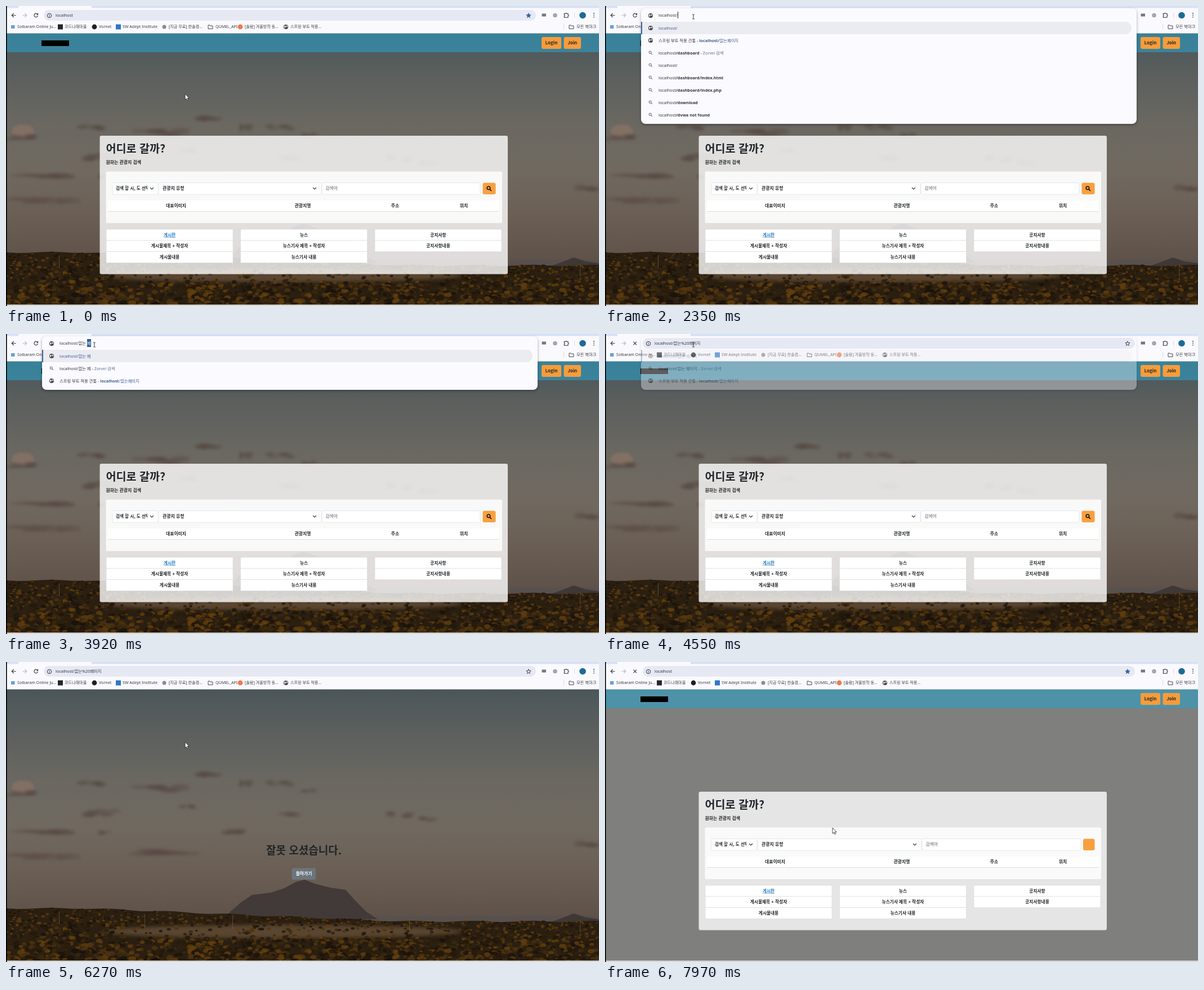
Write an HTML page with a canvas that moves like this. It is 1053 by 532 pixels and loops after 8000 ms.

```html
<!DOCTYPE html>
<html lang="ko">
<head>
<meta charset="utf-8">
<title>Page not found demo</title>
<style>
html, body { margin: 0; width: 100%; height: 100%; overflow: hidden; background: #7f7f7d; }
canvas, svg.layer { position: absolute; left: 0; top: 0; width: 1053px; height: 532px; }
body { font: 7.3px "Noto Sans", "Noto Sans CJK KR", sans-serif; color: #33363b; }
.site text { font-family: "Noto Sans CJK KR", "Noto Sans", sans-serif; font-weight: 700; fill: #212529; }
.mid { text-anchor: middle; }

.loaded { animation: loaded 8s step-end infinite; }
.bare { animation: bare 8s step-end infinite; }
.home { animation: home 8s step-end infinite; }
.lost { animation: lost 8s step-end infinite; }
@keyframes loaded { 0% { opacity: 1 } 57.5% { opacity: 0 } 71.75% { opacity: 1 } 97.875%, 100% { opacity: 0 } }
@keyframes bare { 0% { opacity: 0 } 57.5% { opacity: 1 } 71.75% { opacity: 0 } 97.875%, 100% { opacity: 1 } }
@keyframes home { 0% { opacity: 1 } 57.5% { opacity: 0 } 97.875%, 100% { opacity: 1 } }
@keyframes lost { 0% { opacity: 0 } 57.5% { opacity: 1 } 97.875%, 100% { opacity: 0 } }

#back { fill: #6c757d; animation: hover 8s step-end infinite; }
@keyframes hover { 0% { fill: #6c757d } 86.4%, 100% { fill: #565e64 } }

#drop { position: absolute; left: 64px; top: 4px; width: 880px; border-radius: 8px; background: #fbfaff;
  box-shadow: 0 2px 5px #0005; overflow: hidden; padding-top: 24px; box-sizing: border-box;
  animation: drop 8s linear infinite; }
@keyframes drop { 0%, 25.999% { opacity: 0 } 26%, 55% { opacity: 1 } 56.875% { opacity: .38 } 57.5%, 100% { opacity: 0 } }
.row { position: relative; height: 22px; line-height: 22px; padding-left: 31px; white-space: pre; }
.row:first-child { width: 840px; background: #ebebf2; border-radius: 0 11px 11px 0; box-shadow: inset 2px 0 #3b5f96; color: #3b5f96; }
.row svg { position: absolute; left: 12px; top: 6px; width: 10px; height: 10px; }
.row i { font-style: normal; color: #3b5f96; }
.row u { text-decoration: none; color: #56708a; }
b { font-weight: 700; }

#bar { position: absolute; left: 67px; top: 7px; width: 874px; height: 19px; border-radius: 10px; background: #e6e8f4; }
#bar.focus { background: #fff; box-shadow: inset 0 0 0 1.5px #2f5f9e; }
#bar.open { background: none; }
#url { position: absolute; left: 21px; top: 0; line-height: 19px; white-space: pre; }
.open #url { left: 28px; }
#url mark { background: #2b5f9b; color: #fff; padding: 2px 0; }
#url s { border-left: 1px solid #222; padding: 1px 0; }
#bar svg { position: absolute; width: 10px; height: 10px; top: 4.5px; left: 5px; }
#bar #star { left: 855.5px; }
.open #lead { left: 9px; }

#cursor { animation: move 8s linear infinite; }
@keyframes move {
  0%, .875% { transform: translate(318px, 156px) }
  1.9% { transform: translate(326px, 157px) }
  5% { transform: translate(220px, 70px) }
  8% { transform: translate(70px, 9px) }
  10%, 11% { transform: translate(92px, 17px) }
  14% { transform: translate(150px, 17px) }
  16.25%, 66.6% { transform: translate(157px, 19px) }
  70.9% { transform: translate(315px, 142px) }
  72.6%, 78.4% { transform: translate(318px, 142px) }
  81% { transform: translate(440px, 240px) }
  83.6% { transform: translate(612px, 404px) }
  85.4% { transform: translate(560px, 392px) }
  87%, 95.375% { transform: translate(527px, 380px) }
  99.6%, 100% { transform: translate(404px, 294px) }
}
#arrow { animation: arrow 8s step-end infinite; }
#beam { animation: beam 8s step-end infinite; }
#hand { animation: hand 8s step-end infinite; }
@keyframes arrow { 0% { opacity: 1 } 8% { opacity: 0 } 67.5% { opacity: 1 } 86.4% { opacity: 0 } 96%, 100% { opacity: 1 } }
@keyframes beam { 0% { opacity: 0 } 8% { opacity: 1 } 67.5%, 100% { opacity: 0 } }
@keyframes hand { 0% { opacity: 0 } 86.4% { opacity: 1 } 96%, 100% { opacity: 0 } }
</style>
</head>
<body>
<canvas id="photo" class="loaded" width="1053" height="532"></canvas>
<svg id="stage" class="layer" viewBox="0 0 1053 532">
  <defs>
    <symbol id="globe" viewBox="0 0 10 10">
      <circle cx="5" cy="5" r="4" fill="#3c4045"/>
      <path d="M2 3.6 4.6 3 5.3 4.6 3.8 5.6 4 7.8 2.4 6ZM6 2 8 3.6 7.6 5.8 6.2 5.2Z" fill="#fff"/>
    </symbol>
    <symbol id="info" viewBox="0 0 10 10">
      <circle cx="5" cy="5" r="3.7" fill="none" stroke="#33363b"/>
      <path d="M5 4.6V7M5 2.8V3.8" stroke="#33363b"/>
    </symbol>
    <symbol id="lens" viewBox="0 0 10 10">
      <circle cx="4.2" cy="4.2" r="2.1" fill="none" stroke="#44474c" stroke-width=".9"/>
      <path d="M5.8 5.8 8 8" stroke="#44474c" stroke-width="1"/>
    </symbol>
    <symbol id="folder" viewBox="0 0 10 10">
      <path d="M1 2H4L5 3.2H9V8.4H1Z" fill="none" stroke="#44474c"/>
    </symbol>
  </defs>
</svg>
<div id="drop"></div>
<div id="bar">
  <svg id="lead"><use href="#info"/></svg>
  <span id="url"></span>
  <svg id="star" viewBox="-5 -5 10 10"><path stroke="#2f5f9e" stroke-width=".9" stroke-linejoin="round"/></svg>
</div>
<svg class="layer" viewBox="0 0 1053 532">
  <g id="cursor">
    <path id="arrow" d="M0 0V10.2L2.3 8.1 3.9 11.6 5.5 10.9 4 7.5H7.1Z" fill="#fff" stroke="#222" stroke-width=".8"/>
    <path id="beam" d="M-2-4H-.5L0-3.5 .5-4H2M0-3.5V3.5M-2 4H-.5L0 3.5 .5 4H2" fill="none" stroke="#222" stroke-width=".9"/>
    <path id="hand" d="M-1.2 0Q0-1 1 0V4L5 5Q6 5.4 5.8 7L5 10V12H-.6V10.6L-4 7.4Q-4 5.8-2.6 6.2L-1.2 7.2Z" fill="#fff" stroke="#222" stroke-width=".7"/>
  </g>
</svg>

<script>
const $ = id => document.getElementById(id);

// ---- SVG helpers
const rect = (x1, y1, x2, y2, fill, more = '') =>
  `<rect x="${x1}" y="${y1}" width="${x2 - x1}" height="${y2 - y1}" fill="${fill}" ${more}/>`;
const text = (x, y, s, size = 7.3, more = '') =>
  `<text x="${x}" y="${y + size * .37}" font-size="${size}" ${more}>${s}</text>`;
const mid = (x, y, s, size = 7.8, more = '') => text(x, y, s, size, 'class="mid" ' + more);
const line = (d, color = '#33363b', w = 1.1, more = '') =>
  `<path d="${d}" fill="none" stroke="${color}" stroke-width="${w}" ${more}/>`;
const dot = (x, y, r, fill) => `<circle cx="${x}" cy="${y}" r="${r}" fill="${fill}"/>`;
const icon = (id, x, y, size = 10) =>
  `<use href="#${id}" x="${x - size / 2}" y="${y - size / 2}" width="${size}" height="${size}"/>`;
const chevron = x => line(`M${x - 3} 322 l3 3 3-3`);

// ---- Home page
const box = 'rx="2" stroke="#dee2e6" stroke-width=".8"';
const fields = (x2, x3, x4) =>
  rect(189, 313.5, 270, 334, '#fff', box) + rect(271, 313.5, x2, 334, '#fff', box) +
  rect(x2 + 1, 313.5, x3, 334, '#fff', box) + rect(x4, 313.5, 869.5, 334, '#f8a03f', 'rx="3"') +
  text(278, 323.5, '관광지 유형', 7.9) + text(x2 + 7.5, 323.5, '검색어', 7.7, 'style="fill:#5b6066;font-weight:500"') +
  chevron(259) + chevron(x2 - 12) +
  `<svg x="189" y="313" width="62.5" height="21" viewBox="189 313 62.5 21">${text(195, 323.5, '검색 할 시, 도 선택', 7.6)}</svg>`;

const list = (x, rows) => rows.map((s, i) => {
  const y = 396 + i * 19.8;
  const link = s === '게시판' ? 'style="fill:#2a80c8;text-decoration:underline"' : '';
  return rect(x, y, x + 225, y + 19.8, '#fff', 'stroke="#dcdcdc" stroke-width=".7"') + mid(x + 112.5, y + 9.7, s, 7.7, link);
}).join('');

const home = `<g class="home">
  ${rect(0, 48, 1053, 82, 'rgba(43,160,200,.58)')}
  ${rect(63, 61, 112, 71, '#000')}
  ${rect(951, 55, 986, 76, '#f59c3c', 'rx="3"')}${mid(968.5, 65, 'Login', 8)}
  ${rect(990.5, 55, 1021, 76, '#f59c3c', 'rx="3"')}${mid(1005.7, 65, 'Join', 8)}
  ${rect(166.5, 230, 891, 475.5, 'rgba(255,255,255,.8)', 'rx="3"')}
  ${text(177.5, 253, '어디로 갈까?', 19.6)}
  ${text(177.5, 277.5, '원하는 관광지 검색', 7.9)}
  ${rect(177.5, 293.5, 881, 385, 'rgba(255,255,255,.8)', 'rx="2"')}
  <g class="loaded">${fields(560, 842, 846.5)}
    <circle cx="857" cy="322.8" r="2.8" fill="none" stroke="#111" stroke-width="1.5"/>${line('M859 325 l3 3', '#111', 1.7)}</g>
  <g class="bare">${fields(562, 845, 849)}</g>
  ${rect(181, 345, 876, 364, '#fff')}${line('M181 364.5H876', '#d8dbde', .9)}
  ${mid(302, 354.5, '대표이미지')}${mid(527, 354.5, '관광지명')}${mid(691, 354.5, '주소')}${mid(813, 354.5, '위치')}
  ${list(178, ['게시판', '게시물제목 + 작성자', '게시물내용'])}
  ${list(416.5, ['뉴스', '뉴스기사 제목 + 작성자', '뉴스기사 내용'])}
  ${list(655, ['공지사항', '공지사항내용'])}
</g>`;

// ---- Error page
const lost = `<g class="lost">
  <g class="bare">${rect(504, 365.5, 553.5, 386.5, '#6c757d', 'rx="3"')}</g>
  <g class="loaded">
    ${mid(529, 334, '잘못 오셨습니다.', 19)}
    ${rect(507.5, 365.5, 550, 386, '#6c757d', 'rx="3" id="back"')}
    ${mid(529, 375.5, '돌아가기', 7.8, 'style="fill:#fff"')}
  </g>
</g>`;

// ---- Browser frame
const marks = [
  [20, 'Solbaram Online Ju...'], [104, '코드나래마을'], [165, 'Vornet'], [207, 'SW Adept Institute'],
  [289, '[지금 무료] 한솔겸...'], [372, 'QUMEL_API'], [424, '[솔람] 겨울방학 동...'], [505, '스프링 부트 적용...']
];
const frame = `<g fill="#3a3d42">
  ${rect(0, 0, 1053, 48.5, '#faf9fe')}
  ${rect(0, 0, 22, 3.5, '#d5e1f8', 'rx="1"')}${rect(152, 0, 1053, 3.5, '#d5e1f8', 'rx="1"')}
  ${line('M17.5 16.5H10.5M13.7 13 10.2 16.5 13.7 20')}
  ${line('M29.5 16.5H36.5M33.3 13 36.8 16.5 33.3 20', '#b9bbc0')}
  <g id="reload">${line('M56 14.6A3.3 3.3 0 1 0 56.5 17.2M56.6 12.8V15.2H54')}</g>
  <g id="stop">${line('M50.5 13.7l5.6 5.6m0-5.6l-5.6 5.6')}</g>
  ${rect(951.5, 13.5, 959, 18.5, '#777')}${dot(975, 16.5, 3.8, '#a6a6a6')}
  ${line('M991.3 13.5H993.5Q994.6 11 995.7 13.5H998V15.7Q1000.5 16.7 998 17.8V20.2H991.3V18Q993 16.8 991.3 15.6Z')}
  ${line('M1009.5 12V21', '#cfd6ea', .8)}${dot(1024, 16.5, 5.8, '#1f6a94')}
  ${[13, 16.3, 19.6].map(y => dot(1044, y, .9, '#33363b')).join('')}
  ${rect(9, 34, 15.5, 40, '#6d9fd4')}${rect(92, 32.5, 101, 41.5, '#22262d')}
  ${dot(157, 37, 4.4, '#1b1f23')}${rect(195, 32.5, 204, 41.5, '#2f78c8')}
  ${dot(281, 37, 3.5, '#8b8b8b')}${icon('folder', 363, 37)}${dot(416, 37, 4.4, '#ee7b48')}${icon('globe', 497, 37)}
  ${marks.map(([x, s]) => text(x, 36.5, s, 7.1)).join('')}
  ${line('M990.5 32V41', '#cfd6ea', .8)}${icon('folder', 1004, 37)}${text(1013, 36.5, '모든 북마크')}
  ${rect(0, 529.5, 1053, 532, '#d9d9d7')}${rect(0, 0, 1.6, 532, '#000')}
</g>`;
$('stage').insertAdjacentHTML('beforeend', `<g class="site">${home}${lost}</g>${frame}`);

const starPath = Array.from({ length: 10 }, (_, i) => {
  const r = i % 2 ? 1.8 : 4.3, a = i * Math.PI / 5;
  return `${(r * Math.sin(a)).toFixed(2)} ${(-r * Math.cos(a)).toFixed(2)}`;
}).join('L');
const star = $('star').firstChild;
star.setAttribute('d', `M${starPath}Z`);

// ---- Landscape behind the pages
function paintPhoto() {
  const g = $('photo').getContext('2d');
  let seed = 7;
  const rnd = () => (seed = seed * 16807 % 2147483647) / 2147483647;
  const blob = (x, y, rx, ry, color) => {
    g.fillStyle = color;
    g.beginPath();
    g.ellipse(x, y, rx, ry, 0, 0, 7);
    g.fill();
  };
  const shape = (color, ...pts) => {
    g.fillStyle = color;
    g.beginPath();
    pts.forEach(p => g.lineTo(...p));
    g.fill();
  };
  const sky = g.createLinearGradient(0, 48, 0, 460);
  ['#4b565a', '#5d605e', '#6b6861', '#706960', '#6a5e54', '#5d5048'].forEach((c, i) => sky.addColorStop(i / 5, c));
  g.fillStyle = sky;
  g.fillRect(0, 0, 1053, 532);

  g.filter = 'blur(2px)';
  blob(30, 222, 20, 12, 'rgba(140,116,102,.7)');
  const clouds = [
    [30, 233, 36, 7], [150, 215, 28, 7], [275, 224, 55, 9], [353, 200, 34, 7], [425, 216, 13, 9], [488, 215, 28, 6],
    [540, 228, 16, 3], [170, 268, 38, 9], [320, 256, 18, 4], [500, 270, 24, 5], [405, 302, 32, 7], [700, 271, 26, 6],
    [748, 278, 18, 5], [175, 303, 13, 4], [270, 337, 75, 8], [1025, 322, 32, 7], [60, 302, 70, 7], [70, 345, 70, 7]
  ];
  for (const [x, y, rx, ry] of clouds)
    for (let i = 0; i < 9; i++)
      blob(x + (rnd() - .5) * rx * 1.5, y + (rnd() - .5) * ry, rx * .3, ry * .45, 'rgba(88,70,66,.32)');
  g.filter = 'none';

  shape('#58504d', [630, 451], [1053, 450], [1053, 470], [630, 470]);
  shape('#3f3836', [965, 462], [990, 453], [1008, 446], [1030, 453], [1053, 456], [1053, 465]);
  shape('#423a38', [396, 445], [415, 428], [437, 413], [470, 409], [492, 402], [515, 390], [530, 386], [548, 393],
    [575, 400], [603, 404], [620, 423], [640, 443], [660, 456], [400, 460]);

  const top = x => 437 + 23 * Math.min(1, Math.max(0, (x - 150) / 550)) + Math.sin(x / 17) * 1.2;
  const ground = Array.from({ length: 54 }, (_, i) => [i * 20, top(i * 20)]);
  shape('#2b1f11', ...ground, [1060, 532], [0, 532]);
  g.filter = 'blur(3px)';
  blob(490, 478, 320, 12, '#594530');
  g.filter = 'none';
  const leaves = ['#1a130b', '#281c0d', '#3a280f', '#4d3310', '#633f0d', '#21180c'];
  const count = 2600;
  for (let i = 0; i < count; i++) {
    const x = rnd() * 1053, depth = i / count, y = top(x) + depth * (534 - top(x));
    const field = x > 210 && x < 810 && y > 468 && y < 490;
    const color = leaves[Math.floor(rnd() * 6)], r = 1.5 + depth * 4 * rnd();
    if (field && rnd() < .72) continue;
    g.globalAlpha = .8;
    blob(x, y, r * 1.5, r, color);
  }
  g.globalAlpha = .6;
  for (const [x, y] of [[94, 441], [246, 447], [402, 449], [716, 455], [1019, 459]]) {
    g.fillStyle = '#75644f';
    g.fillRect(x, y, 1, 24);
  }
}
paintPhoto();

// ---- Address bar: [time, settled text, character being composed]
const typing = [
  [2080, '', ''], [2610, '', 'ㅇ'], [2740, '', '어'], [3070, '', '업'], [3210, '', '없'],
  [3390, '없', 'ㄴ'], [3490, '없', '느'], [3590, '없', '는'], [3690, '없는 ', ''], [3790, '없는 ', 'ㅍ'],
  [3890, '없는 ', '페'], [3990, '없는 페', '이'], [4090, '없는 페', '잊'], [4190, '없는 페이', '지']
];
const host = 'localhost';
const row = (id, html) => `<div class="row"><svg><use href="#${id}"/></svg>${html}</div>`;

function suggestions(word) {
  const first = row('globe', `${host}/${word}`);
  const search = ' - <u>Zorvel 검색</u>';
  const known = '스프링 부트 적용 관통 - ';
  if (word.length > 1) {
    return first + row('lens', `${host}/${word}${search}`) + row('globe', `${known}<i><b>${host}</b>/없는페이지</i>`);
  }
  const hit = word === '없' ? '없' : '';
  return first + row('globe', `${known}<i><b>${host}/${hit}</b>${hit ? '는페이지' : '없는페이지'}</i>`) +
    row('lens', `${host}<b>/dashboard</b>${search}`) + row('lens', `${host}/${word}`) +
    ['/dashboard/index.html', '/dashboard/index.php', '/download', '/dvwa not found']
      .map(s => row('lens', `${host}<b>${s}</b>`)).join('');
}

function address(t) {
  if (t < 1120 || t >= 7360) return host;
  if (t < 1550) return `<mark>${host}</mark>`;
  if (t < 2080) return host + '<s></s>';
  if (t >= 4400) return host + '/없는%20페이지';
  const [, done, part] = typing.findLast(k => k[0] <= t);
  return `${host}/${done}` + (part ? `<mark>${part}</mark>` : '<s></s>');
}

const shown = {};
function setHtml(id, html) {
  if (shown[id] !== html) $(id).innerHTML = shown[id] = html;
}

const start = performance.now();
function draw() {
  const t = (performance.now() - start) % 8000;
  const open = t >= 2080 && t < 4400;
  const loading = t >= 4400 && t < 4870 || t >= 7360;
  const [, done, part] = typing.findLast(k => k[0] <= t) || typing[0];
  const word = done + part;
  setHtml('url', address(t));
  setHtml('drop', suggestions(word));
  setHtml('lead', `<use href="#${open ? 'globe' : 'info'}"/>`);
  $('drop').style.height = word.length > 1 ? '95px' : '205px';
  $('bar').className = open ? 'open' : t >= 1120 && t < 2080 ? 'focus' : '';
  $('star').style.opacity = open ? 0 : 1;
  const saved = t < 4400 || t >= 7360;
  star.setAttribute('fill', saved ? '#2f5f9e' : 'none');
  star.setAttribute('stroke', saved ? '#2f5f9e' : '#33363b');
  $('reload').style.opacity = loading ? 0 : 1;
  $('stop').style.opacity = loading ? 1 : 0;
  requestAnimationFrame(draw);
}
draw();
</script>
</body>
</html>
```
